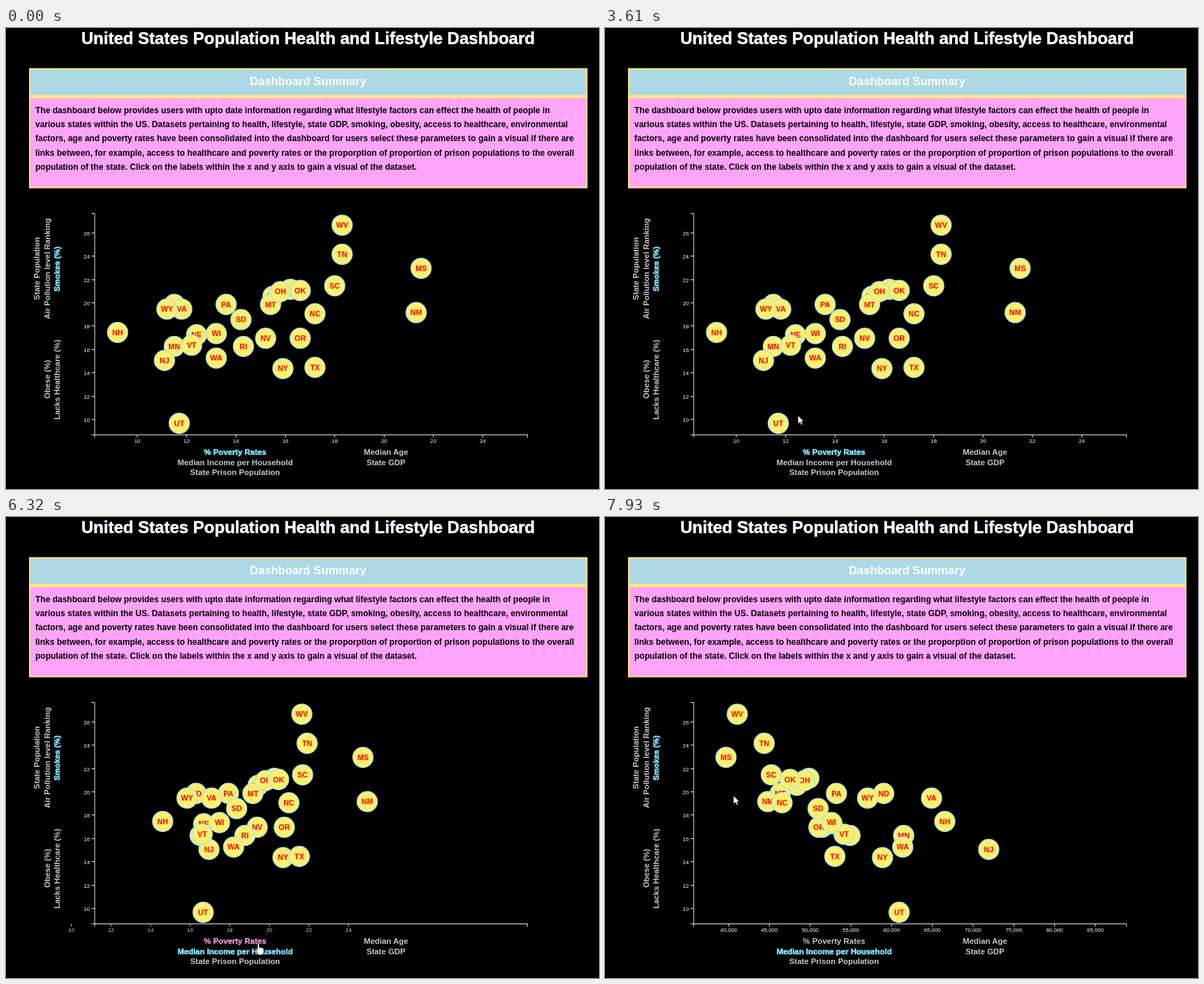
An HTML page for the animation above (8 s loop, 849 by 660 pixels).

```html
<!DOCTYPE html>
<html lang="en">
<head>
<meta charset="utf-8">
<title>Population dashboard</title>
<style>
  html, body { margin: 0; width: 100%; height: 100%; overflow: hidden; background: #000; }
  svg { display: block; width: 849px; height: 660px; }
  text { font: bold 11.4px "Liberation Sans", sans-serif; text-anchor: middle; fill: #c8c8c8; stroke-linejoin: round; }
  .title { font-size: 24px; fill: #fff; stroke: #fff; stroke-width: .5; }
  .heading { font-size: 16.6px; fill: #fff; }
  .summary { font-size: 12px; text-anchor: start; fill: #000; }
  .active { fill: #80e5ff; stroke: #80e5ff; stroke-width: .6; }
  .tick { font-size: 7.8px; font-weight: normal; fill: #fff; }
  .end { text-anchor: end; }
  .line { fill: none; stroke: #e8e8e8; stroke-width: 1; }
  .state circle { fill: #fff06c; stroke: #a9e6ea; stroke-width: 1.5; }
  .state text { font-size: 10.8px; fill: #f00; }
  .tip text { font-size: 11px; fill: #fff; }
</style>
</head>
<body>
<svg id="stage" viewBox="0 0 849 660" xmlns="http://www.w3.org/2000/svg">
  <clipPath id="plot"><rect x="33" y="240" width="767" height="420"/></clipPath>
</svg>
<script>
const LOOP = 8000, STEP = 77.1, FIRST = 130;
const CLICK = 5931, DURATION = 1000;
const stage = document.getElementById('stage');

function add(parent, tag, attrs = {}, content) {
  const node = document.createElementNS('http://www.w3.org/2000/svg', tag);
  for (const key in attrs) node.setAttribute(key, attrs[key]);
  if (content !== undefined) node.textContent = content;
  parent.append(node);
  return node;
}
const label = (x, y, content, cls = '', parent = stage) =>
  add(parent, 'text', { x, y, class: cls }, content);
const rect = (x, y, width, height, fill, parent = stage) =>
  add(parent, 'rect', { x, y, width, height, fill });
const move = (node, x, y) => node.setAttribute('transform', `translate(${x} ${y})`);
const clamp = v => Math.max(0, Math.min(1, v));
const mix = (a, b, p) => a + (b - a) * p;
const cubicInOut = t => t < .5 ? 4 * t ** 3 : 1 - 4 * (1 - t) ** 3;

// Scales
const povertyX = v => 188 + (v - 10) * 35.33;
const incomeX = v => 177 + (v - 40000) * 0.011667;
const smokesY = v => 561 - (v - 10) * 16.69;

// Header and summary
label(432.5, 23, 'United States Population Health and Lifestyle Dashboard', 'title');
rect(33, 57.5, 799.5, 172, '#ffe978');
rect(35, 59.5, 795.5, 36.5, '#add8e6');
rect(35, 100.5, 795.5, 127, '#ffa3fb');
label(432.5, 82, 'Dashboard Summary', 'heading');
[
  'The dashboard below provides users with upto date information regarding what lifestyle factors can effect the health of people in',
  'various states within the US. Datasets pertaining to health, lifestyle, state GDP, smoking, obesity, access to healthcare, environmental',
  'factors, age and poverty rates have been consolidated into the dashboard for users select these parameters to gain a visual if there are',
  'links between, for example, access to healthcare and poverty rates or the proporption of proportion of prison populations to the overall',
  'population of the state. Click on the labels within the x and y axis to gain a visual of the dataset.'
].forEach((line, i) => label(42, 122 + 20.2 * i, line, 'summary'));

// Axis labels
const poverty = label(328, 611, '% Poverty Rates');
const income = label(328, 625.5, 'Median Income per Household');
label(328, 640, 'State Prison Population');
label(544, 611, 'Median Age');
label(544, 625.5, 'State GDP');
for (const [x, y, content, cls] of [
  [48, 344.5, 'State Population'], [62.5, 344.5, 'Air Pollution level Ranking'],
  [77, 345, 'Smokes (%)', 'active'], [62.5, 503, 'Obese (%)'], [77, 503.5, 'Lacks Healthcare (%)']
]) label(0, 0, content, cls).setAttribute('transform', `translate(${x} ${y}) rotate(-90)`);

// Axes
const chart = add(stage, 'g', { 'clip-path': 'url(#plot)' });
add(chart, 'path', { class: 'line', d: 'M122.5 265.5H127V582.5H122.5M127 586.5V582.5H746.5V586.5' });
for (let v = 10; v <= 26; v += 2) {
  const y = Math.round(smokesY(v));
  add(chart, 'path', { class: 'line', d: `M122.5 ${y - .5}H127` });
  label(120, y + 2.5, v, 'tick end', chart);
}
function xTicks(from, to, step) {
  const ticks = [];
  for (let value = from; value <= to; value += step) {
    const node = add(chart, 'g');
    add(node, 'path', { class: 'line', d: 'M0 582.5V586.5' });
    label(0, 594, value.toLocaleString('en-US'), 'tick', node);
    ticks.push({ node, value });
  }
  return ticks;
}
const povertyTicks = xTicks(10, 24, 2);
const incomeTicks = xTicks(40000, 85000, 5000);

// State: poverty %, household income, smokers %
const states = Object.entries({
  MI: [16.2, 49847, 21.2], MN: [11.5, 61481, 16.3], MS: [21.5, 39680, 23], MO: [15.5, 48363, 20.6],
  MT: [15.4, 46328, 19.9], NE: [12.4, 52686, 17.3], NV: [15.2, 51450, 17], NH: [9.2, 66532, 17.5],
  NJ: [11.1, 71919, 15.1], NM: [21.3, 44803, 19.2], NY: [15.9, 58878, 14.4], NC: [17.2, 46556, 19.1],
  ND: [11.5, 59029, 19.9], OH: [15.8, 49308, 21], OK: [16.6, 47529, 21.1], OR: [16.6, 51075, 17],
  PA: [13.6, 53234, 19.9], RI: [14.3, 54891, 16.3], SC: [18, 45238, 21.5], SD: [14.2, 50979, 18.6],
  TN: [18.3, 44361, 24.2], TX: [17.2, 53035, 14.5], UT: [11.7, 60922, 9.7], VT: [12.2, 54166, 16.4],
  VA: [11.8, 64902, 19.5], WA: [13.2, 61366, 15.3], WV: [18.3, 41059, 26.7], WI: [13.2, 52622, 17.4],
  WY: [11.2, 57055, 19.5]
}).map(([code, [pov, inc, smokes]]) => {
  const node = add(chart, 'g', { class: 'state' });
  add(node, 'circle', { r: 14.4 });
  label(0, 3.8, code, '', node);
  return { node, from: povertyX(pov), to: incomeX(inc), y: smokesY(smokes) };
});

// Tooltips
function tooltip(x, y, width, lines, start, end) {
  const node = add(stage, 'g', { class: 'tip' });
  rect(x, y, width, 134, 'rgba(0,0,0,.8)', node).setAttribute('rx', 4);
  lines.forEach((line, i) => label(x + width / 2, y + 38 + 32 * i, line, '', node));
  return { node, start, end };
}
const tips = [
  tooltip(487, 330, 108, ['New Mexico', 'Poverty: 21.3%', 'Smokes: 19.2%'], 1050, 1670),
  tooltip(158, 489, 86, ['Utah', 'Poverty: 11.7%', 'Smokes: 9.7%'], 4055, 4670)
];

// Pointer: time, x, y of its tip
const path = [
  [130, 802, 648], [500, 700, 530], [900, 594, 430], [977, 592, 425], [1130, 588, 414], [1590, 588, 414],
  [1672, 582, 441], [1980, 440, 500], [2290, 302, 530], [2990, 302, 530], [3300, 404, 411],
  [3600, 276, 555], [3831, 261, 556], [3990, 261, 556], [4140, 248, 563], [4600, 248, 563],
  [5000, 305, 592], [5450, 362, 608], [5527, 363, 614], [5680, 366, 620], [5912, 366, 620],
  [6140, 361, 610], [6840, 361, 610], [7220, 285, 535], [7600, 221, 459], [7915, 184, 399]
];
const arrow = add(stage, 'path', {
  d: 'M0 0V12L2.8 9.4L4.7 13.6L6.6 12.8L4.8 8.7H8.6Z', fill: '#fff', stroke: '#000', 'stroke-width': .6
});
const hand = add(stage, 'path', {
  d: 'M-1 1Q0-1 1.5 1V6L6.5 7Q8 7.4 8 9V12L6.5 17H.5L-3.2 11.4Q-3.5 9-1 10Z',
  fill: '#fff', stroke: '#000', 'stroke-width': .7
});

function pointerAt(t) {
  const i = path.findIndex(p => p[0] > t);
  if (i < 0) return path[path.length - 1].slice(1);
  if (i === 0) return path[0].slice(1);
  const [a, b] = [path[i - 1], path[i]], p = (t - a[0]) / (b[0] - a[0]);
  return [mix(a[1], b[1], p), mix(a[2], b[2], p)];
}

function paintLabel(node, active, hover) {
  const base = active ? [128, 229, 255] : [200, 200, 200];
  const pink = [255, 121, 223];
  const color = `rgb(${base.map((c, i) => Math.round(mix(c, pink[i], hover)))})`;
  node.style.fill = node.style.stroke = color;
  node.style.strokeWidth = active ? .6 : .6 * hover;
}
const hoverAmount = (t, start, end) => clamp((t - start) / 250) - clamp((t - end) / 250);

function draw(time) {
  const t = time < FIRST ? 0 : FIRST + Math.floor((time - FIRST) / STEP + .05) * STEP;
  const linear = clamp((t - CLICK) / DURATION);
  const p = cubicInOut(linear);
  const clicked = linear > 0;

  for (const s of states) move(s.node, mix(s.from, s.to, p), s.y);
  const place = (ticks, opacity) => ticks.forEach(({ node, value }) => {
    const x = mix(povertyX(value), incomeX(value), p);
    const visible = opacity > 0 && x > 0 && x < 849;
    node.style.display = visible ? '' : 'none';
    node.style.opacity = opacity;
    if (visible) move(node, x, 0);
  });
  place(povertyTicks, 1 - p);
  place(incomeTicks, p);

  paintLabel(poverty, !clicked, hoverAmount(t, 6140, 6900));
  paintLabel(income, clicked, clicked ? 0 : hoverAmount(t, 5500, LOOP));

  for (const { node, start, end } of tips) node.style.display = t >= start && t < end ? '' : 'none';

  const [x, y] = pointerAt(t);
  const overLabel = y > 601 && t > 5000;
  arrow.style.display = t >= FIRST && !overLabel ? '' : 'none';
  hand.style.display = overLabel ? '' : 'none';
  move(overLabel ? hand : arrow, x, y);
}

const began = performance.now();
function tick() {
  draw((performance.now() - began) % LOOP);
  requestAnimationFrame(tick);
}
tick();
</script>
</body>
</html>
```
